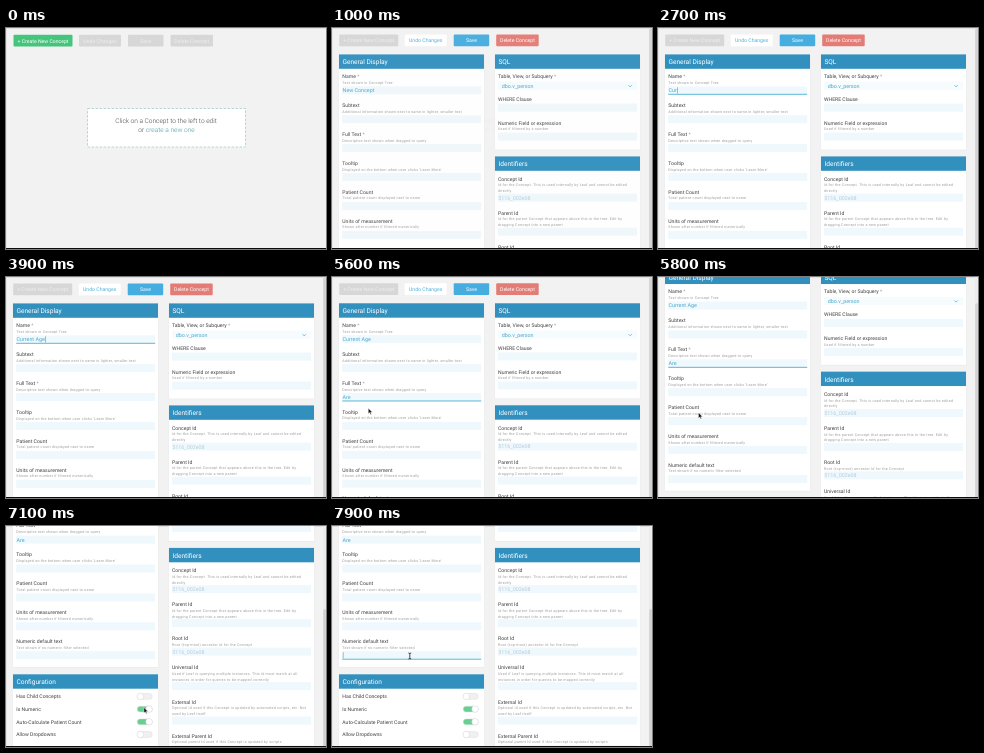
An HTML page that plays this animation: 320 by 221 pixels, repeating every 8000 ms.

```html
<!DOCTYPE html>
<html lang="en">
<head>
<meta charset="utf-8">
<title>Concept editor</title>
<style>
html, body { margin: 0; width: 100%; height: 100%; overflow: hidden; background: #f2f2f2; }
svg { display: block; width: 320px; height: 221px; }
text { font-family: Roboto, "Liberation Sans", sans-serif; text-rendering: geometricPrecision; white-space: pre; }
</style>
</head>
<body>
<svg id="stage" viewBox="0 0 320 221"></svg>
<script>
const LOOP = 8000;
const BLUE = '#3290be', VALUE = '#45a8cf', FOCUS = '#5cb9d8';
const stage = document.getElementById('stage');

function add(parent, tag, attrs) {
  const el = document.createElementNS('http://www.w3.org/2000/svg', tag);
  for (const key in attrs) el.setAttribute(key, attrs[key]);
  parent.append(el);
  return el;
}
const group = parent => add(parent, 'g', {});
const rect = (p, x, y, width, height, fill, more) => add(p, 'rect', { x, y, width, height, fill, ...more });

// y is the middle of the capitals
function text(p, x, y, str, size, fill, more) {
  const el = add(p, 'text', { x, y: y + size * 0.36, 'font-size': size, fill, ...more });
  el.textContent = str;
  return el;
}

function button(p, x, w, label, fill, color) {
  rect(p, x, 6.8, w, 11.8, fill, { rx: 1 });
  text(p, x + w / 2, 12.9, label, 5.15, color, { 'text-anchor': 'middle' });
}

function card(p, x, y, h, title) {
  rect(p, x - 0.3, y, 145.6, h + 0.6, '#e9e9e9');
  rect(p, x, y, 145, h, '#fff');
  rect(p, x, y - 0.2, 145, 14.4, BLUE);
  text(p, x + 3.4, y + 7.3, title, 6.6, '#fff');
}

function label(p, x, y, str) {
  const [name, star] = str.split('*');
  const el = text(p, x, y, name, 5.1, '#404040');
  if (star !== undefined) add(el, 'tspan', { fill: '#8fa3b0' }).textContent = '*';
}

function notes(p, x, y, lines) {
  lines.forEach((line, i) =>
    text(p, x, y + i * 5.6, line, 3.7, '#9c9c9c', { 'letter-spacing': 0.2 }));
}

const input = (p, x, y, fill = '#eff8fc') => rect(p, x, y, 139, 8, fill);

// Start screen
const idle = group(stage);
const GREY = '#d7d7d7', FAINT = '#efefef';
button(idle, 7.5, 59, '+ Create New Concept', '#45c57c', '#fff');
button(idle, 73, 42, 'Undo Changes', GREY, FAINT);
button(idle, 122, 35.5, 'Save', GREY, FAINT);
button(idle, 164.5, 42.5, 'Delete Concept', GREY, FAINT);
rect(idle, 81.5, 80.5, 158, 38.5, '#fff', { stroke: '#9bcfd2', 'stroke-width': 0.8, 'stroke-dasharray': '2.4 1.6' });
const middle = { 'text-anchor': 'middle', 'font-weight': 300 };
text(idle, 160, 92.4, 'Click on a Concept to the left to edit', 6.55, '#444', middle);
const hint = text(idle, 160.5, 101.6, 'or ', 6.55, '#444', middle);
add(hint, 'tspan', { fill: '#3f9ba5' }).textContent = 'create a new one';
rect(stage, 0, 0, 320, 0.7, '#d9d9d9');

// Editor form
const form = group(stage);
const page = group(form);
button(page, 7.5, 59, '+ Create New Concept', GREY, FAINT);
button(page, 73, 42, 'Undo Changes', '#fff', '#4fb0dc');
button(page, 122, 35.5, 'Save', '#46ade0', '#fff');
button(page, 164.5, 42.5, 'Delete Concept', '#e47c76', '#fff');

card(page, 7.3, 27, 221, 'General Display');
const FIELDS = [
  ['Name *', 'Text shown in Concept Tree'],
  ['Subtext', 'Additional information shown next to name in lighter, smaller text'],
  ['Full Text *', 'Descriptive text shown when dragged to query'],
  ['Tooltip', "Displayed on the bottom when user clicks 'Learn More'"],
  ['Patient Count', 'Total patient count displayed next to name'],
  ['Units of measurement', 'Shown after number if filtered numerically'],
  ['Numeric default text', 'Text shown if no numeric filter selected']
];
const fieldY = i => 48.7 + i * 28.9;
FIELDS.forEach(([name, note], i) => {
  label(page, 10.6, fieldY(i), name);
  notes(page, 10.6, fieldY(i) + 6.2, [note]);
  input(page, 10.5, fieldY(i) + 10);
});

card(page, 7.3, 255.4, 120, 'Configuration');
const toggles = ['Has Child Concepts', 'Is Numeric', 'Auto-Calculate Patient Count', 'Allow Dropdowns'].map((name, i) => {
  const y = 277.2 + i * 12.7;
  label(page, 10.6, y, name);
  const track = rect(page, 131.5, y - 2.8, 15, 5.8, '#eee', { rx: 2.9, stroke: '#dcdcdc', 'stroke-width': 0.5 });
  const knob = add(page, 'circle', { cy: y + 0.1, r: 3.3, fill: '#fff', stroke: '#d2d2d2', 'stroke-width': 0.5 });
  return on => {
    track.setAttribute('fill', on > 0.5 ? '#66cf91' : '#f0f0f0');
    knob.setAttribute('cx', 134.6 + 8.8 * on);
  };
});

card(page, 163.3, 27, 95, 'SQL');
label(page, 166.3, 48.7, 'Table, View, or Subquery *');
input(page, 166.3, 54, '#f6fbfe');
text(page, 170, 58.5, 'dbo.v_person', 5.35, VALUE);
add(page, 'path', { d: 'M296.8 57.6l1.7 1.7l1.7-1.7', fill: 'none', stroke: VALUE, 'stroke-width': 0.7 });
label(page, 166.3, 71.7, 'WHERE Clause');
input(page, 166.3, 76);
label(page, 166.3, 95.2, 'Numeric Field or expression');
notes(page, 166.3, 101.4, ['Used if filtered by a number']);
input(page, 166.3, 105);

card(page, 163.3, 129, 250, 'Identifiers');
const ID = '5116_002e08';
[
  [151.2, 'Concept Id', ['Id for the Concept. This is used internally by Leaf and cannot be edited', 'directly'], ID],
  [185.2, 'Parent Id', ['Id for the parent Concept that appears above this in the tree. Edit by', 'dragging Concept into a new parent']],
  [219.2, 'Root Id', ['Root (top-most) ancestor Id for the Concept'], ID],
  [248.2, 'Universal Id', ['Used if Leaf is querying multiple instances. This Id must match at all', 'instances in order for queries to be mapped correctly']],
  [282.6, 'External Id', ['Optional Id used if this Concept is updated by automated scripts, etc. Not', 'used by Leaf itself']],
  [316.7, 'External Parent Id', ['Optional parent Id used if this Concept is updated by scripts']]
].forEach(([y, name, lines, value]) => {
  const top = y + 9.3 + (lines.length - 1) * 5.6;
  label(page, 166.3, y, name);
  notes(page, 166.3, y + 6.3, lines);
  input(page, 166.3, top);
  if (value) text(page, 166.6, top + 4, value, 5.35, '#b3cedd');
});

// Moving parts of the form
const selection = rect(page, 10.8, 59.3, 32.2, 6.6, '#b9dcf3');
const nameText = text(page, 10.9, 62.7, '', 5.35, VALUE);
const fullText = text(page, 10.9, fieldY(2) + 14, '', 5.35, VALUE);
const line = rect(page, 10.5, 0, 139, 1, FOCUS);
const caret = rect(page, 0, 0, 0.6, 6.2, '#5f8fa4');

// Window edges
rect(form, 317, 0, 3, 221, '#ececec');
const thumb = rect(form, 317.2, 0, 2.8, 260, '#d3d3d3', { rx: 1.4 });
rect(stage, 0, 0, 0.6, 221, '#dedede');
rect(stage, 0, 220, 320, 1, '#0c0c0c');

const pointer = group(stage);
const arrow = add(pointer, 'path', {
  d: 'M0 0V5.6L1.3 4.4L2.2 6.4L3.1 6L2.2 4.1H4Z', fill: '#111', stroke: '#fff', 'stroke-width': 0.4
});
const beam = add(pointer, 'path', {
  d: 'M-1.4-3Q0-3 0-2.2Q0-3 1.4-3M0-2.4V2.4M-1.4 3Q0 3 0 2.2Q0 3 1.4 3',
  fill: 'none', stroke: '#222', 'stroke-width': 0.8
});

// Tables of [time, values...]
const SCROLL = [[5600, 0], [5700, 12], [5800, 33.5], [5900, 60], [6000, 83], [6100, 98], [6200, 106.5]];
const MOVES = [
  [1100, 40, 15], [1350, 52, 40], [1600, 63, 65], [1900, 63, 65],
  [5400, 34, 127], [5600, 36.3, 131.2], [5800, 40.4, 135.6], [6200, 78, 156],
  [6400, 114, 175.3], [6600, 131, 181], [6800, 138, 181.5], [7100, 138, 181.5],
  [7300, 122, 166], [7500, 95, 144], [7700, 77.8, 130], [8000, 77.8, 130]
];
const NAME = [
  [0, 'New Concept'], [2400, 'C'], [2600, 'Cu'], [2700, 'Cur'], [2900, 'Curr'], [3000, 'Curre'],
  [3100, 'Curren'], [3200, 'Current'], [3500, 'Current A'], [3700, 'Current Ag'], [3900, 'Current Age']
];
const FULL = [[0, ''], [4600, 'A'], [4900, 'Ar'], [5000, 'Are']];
const FOCUSED = [[0, -1], [1900, 0], [4100, 1], [4300, 2], [7000, -1], [7800, 6]];
const CARET = [[0, false], [2400, true], [5400, false], [6300, true], [7000, false], [7800, true]];

const step = (table, t) => table.filter(row => row[0] <= t).pop()[1];
const clamp = v => Math.min(1, Math.max(0, v));
const between = (t, a, b) => t >= a && t < b;
const show = (el, on) => el.setAttribute('visibility', on ? 'visible' : 'hidden');

function glide(table, t, col = 1) {
  const i = table.findIndex(row => row[0] > t);
  if (i === 0) return table[0][col];
  if (i < 0) return table[table.length - 1][col];
  const a = table[i - 1], b = table[i];
  return a[col] + (b[col] - a[col]) * (t - a[0]) / (b[0] - a[0]);
}

function draw(t) {
  const p = clamp((t - 250) / 850);
  const fade = p * p * (3 - 2 * p);
  idle.setAttribute('opacity', 1 - fade);
  form.setAttribute('opacity', fade);

  const scroll = glide(SCROLL, t);
  page.setAttribute('transform', `translate(-0.3 ${-0.4 - scroll})`);
  thumb.setAttribute('y', scroll * 0.78);

  nameText.textContent = step(NAME, t);
  fullText.textContent = step(FULL, t);
  show(selection, between(t, 1900, 2400));

  const focus = step(FOCUSED, t);
  show(line, focus >= 0);
  show(caret, focus >= 0 && step(CARET, t));
  if (focus >= 0) {
    const y = fieldY(focus);
    const typed = focus === 0 ? nameText : focus === 2 ? fullText : null;
    line.setAttribute('y', y + 17.5);
    caret.setAttribute('y', y + 11);
    caret.setAttribute('x', 11.1 + (typed ? typed.getComputedTextLength() : 0));
  }

  const flip = clamp((t - 6950) / 150);
  [0, flip, 1, 0].forEach((on, i) => toggles[i](on));

  show(pointer, between(t, 1200, 1900) || t >= 5400);
  pointer.setAttribute('transform', `translate(${glide(MOVES, t, 1)} ${glide(MOVES, t, 2)})`);
  const typing = between(t, 1550, 1900) || t >= 7650;
  arrow.setAttribute('opacity', typing ? 0 : 1);
  beam.setAttribute('opacity', typing ? 1 : 0);
}

const start = performance.now();
function tick() {
  draw((performance.now() - start) % LOOP);
  requestAnimationFrame(tick);
}
tick();
</script>
</body>
</html>
```
